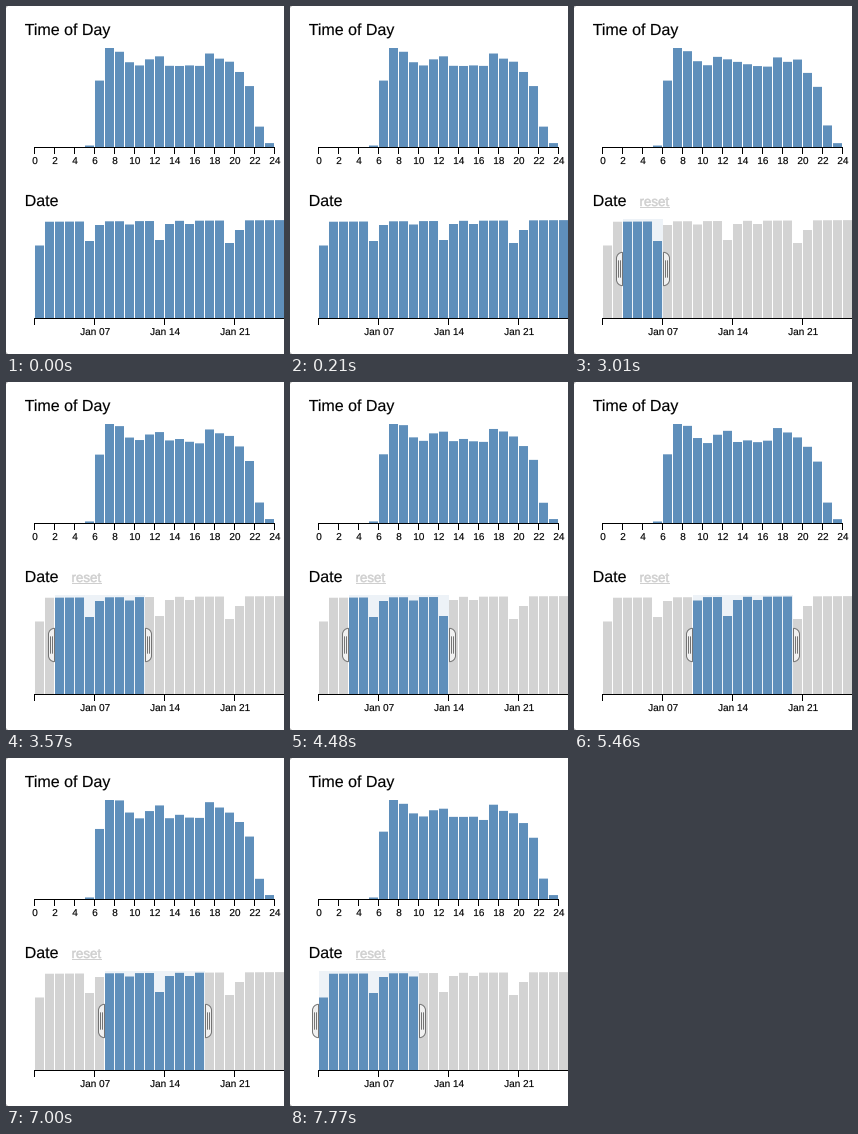
A matplotlib script for the animation above (8 s loop, 278 px wide and 348 px high).

```python
import numpy as np
import matplotlib.pyplot as plt
from matplotlib.animation import FuncAnimation
from matplotlib.collections import PolyCollection
from matplotlib.patches import PathPatch, Polygon, Rectangle
from matplotlib.path import Path
from matplotlib.textpath import TextPath
from matplotlib.transforms import Affine2D

W, H, DPI = 278, 348, 64
PX = 72 / DPI                      # points per pixel
LOOP, STEP = 8000, 40
X0, HOUR_Y, DATE_Y = 29, 142, 313  # chart left edge and the two baselines
BLUE, GREY, PALE, FAINT = "#5f8fbb", "#d3d3d3", "#edf2f7", "#cfcfcf"
DAYS, HOURS = 28, 24

plt.rcParams["font.family"] = "Liberation Sans"

# Daily totals: nearly flat and slowly rising, apart from quiet days
QUIET = {0: 73.5, 5: 78, 6: 94, 9: 94.5, 12: 79, 13: 95, 15: 95, 19: 76, 20: 89}
day_heights = np.array([QUIET.get(d, 97.2 + .07 * d) for d in range(DAYS)])

# Traffic by hour: a common curve with seeded variation from day to day
CURVE = [(4, 0), (5, 2.5), (6, 68), (7, 100), (8, 98), (9, 85.5), (10, 83.5),
         (12, 91), (13, 83), (16, 84), (17, 96), (18, 89.5), (19, 86.5),
         (20, 77.5), (21, 63), (22, 21.5), (23, 5)]
noise = np.random.default_rng(4).normal(1, .05, (DAYS, HOURS))
traffic = np.interp(np.arange(HOURS), *zip(*CURVE)) * noise

# Brush motion as (ms, day) points: stretch to ten days, drag right, sweep back
OPEN_TIME = 2310
WIDTH = [(2460, 0), (3710, 10)]
START = [(4000, 2), (4400, 2), (4410, 3), (4620, 4), (4970, 5), (5460, 9),
         (5810, 13), (6440, 17), (6510, 17), (6580, 16), (7280, 3), (7560, 0)]


def whole_days(t, points):
    return int(np.interp(t, *zip(*points)) + 1e-6)


def brush_at(t):
    """First and last edge of the brush in days, or None when closed."""
    if t < OPEN_TIME:
        return None
    start = whole_days(t, START)
    return start, start + whole_days(t, WIDTH)


def hour_heights(brush):
    first, last = brush or (0, DAYS)
    total = traffic[first:last].sum(axis=0)
    return 100 * total / max(total.max(), 1)


def bar_verts(heights, base):
    return [[(x, base), (x, base - h), (x + 9, base - h), (x + 9, base)]
            for x, h in zip(X0 + 10 * np.arange(len(heights)), heights)]


def handle_path(side):
    """Rounded grip with two ridges; side is -1 for left, 1 for right."""
    top, bottom = DATE_Y - 200 / 3, DATE_Y - 100 / 3
    k = 2.69
    pts = [(.5, top), (6.5 - k, top), (6.5, top + k), (6.5, top + 6),
           (6.5, bottom - 6), (6.5, bottom - k), (6.5 - k, bottom), (.5, bottom),
           (.5, top)]
    curve = [Path.LINETO] + [Path.CURVE4] * 3
    codes = [Path.MOVETO] + curve[1:] + curve + [Path.CLOSEPOLY]
    for x in (2.5, 4.5):
        pts += [(x, top + 8), (x, bottom - 8)]
        codes += [Path.MOVETO, Path.LINETO]
    return Path([(side * x, y) for x, y in pts], codes)


fig = plt.figure(figsize=(W / DPI, H / DPI), dpi=DPI, facecolor="white")
ax = fig.add_axes([0, 0, 1, 1])
ax.set_xlim(0, W)
ax.set_ylim(H, 0)
ax.axis("off")


def box(x, y, w, h, color, z):
    return ax.add_patch(Rectangle((x, y), w, h, fc=color, lw=0, zorder=z))


def label(x, y, text, size, color="black", centered=False, weight=.15):
    """Text as outlines, so that it keeps its place between pixels."""
    path = TextPath((0, 0), text, size=size)
    if centered:
        ink = path.get_extents()
        x -= (ink.x0 + ink.x1) / 2
    path = path.transformed(Affine2D().scale(1, -1).translate(x, y))
    return ax.add_patch(PathPatch(path, fc=color, ec=color, lw=weight * PX, zorder=4))


def axis(base, right, ticks):
    box(X0 - 1, base - 1, right - X0 + 1, 1, "black", 4)
    box(X0 - 1, base, 1, 6, "black", 4)
    for x, text in ticks:
        box(x - 1, base, 1, 6, "black", 4)
        label(x, base + 16, text, 10, centered=True)


def bars(heights, base):
    group = PolyCollection(bar_verts(heights, base), fc=BLUE, lw=0, zorder=3)
    group.set_snap(False)
    return ax.add_collection(group, autolim=False)


label(18.7, 29, "Time of Day", 16)
label(18.7, 200, "Date", 16)
axis(HOUR_Y, X0 + 240, [(X0 + 10 * h, str(h)) for h in range(0, 25, 2)])
axis(DATE_Y, W, [(X0 + 10 * d - 10, f"Jan {d:02d}") for d in (7, 14, 21)])
for y, dy in ((0, 2), (H, -2)):
    ax.add_patch(Polygon([(0, y), (2, y), (0, y + dy)], fc="#b4b4b4", lw=0))

hours = bars(hour_heights(None), HOUR_Y)
days = bars(day_heights, DATE_Y)

extent = box(X0, DATE_Y - 100, 0, 100, PALE, 2)
grips = [ax.add_patch(PathPatch(handle_path(s), fc="#f0f0f0", ec="#747474",
                                lw=PX, zorder=5)) for s in (-1, 1)]
reset = [label(65.5, 200, "reset", 13.33, FAINT, weight=.5),
         box(66, 201, 30, 1, FAINT, 3)]
brush_parts = [extent, *grips, *reset]


def update(n):
    brush = brush_at(n * STEP + STEP - 5)
    hours.set_verts(bar_verts(hour_heights(brush), HOUR_Y))
    for part in brush_parts:
        part.set_visible(brush is not None)
    first, last = brush or (0, DAYS)
    days.set_facecolor([BLUE if first <= d < last else GREY for d in range(DAYS)])
    extent.set_x(X0 + 10 * first)
    extent.set_width(10 * (last - first))
    for grip, day in zip(grips, (first, last)):
        grip.set_transform(Affine2D().translate(X0 + 10 * day, 0) + ax.transData)
    return [hours, days, *brush_parts]


anim = FuncAnimation(fig, update, frames=LOOP // STEP, interval=STEP,
                     init_func=lambda: update(0), repeat=True, repeat_delay=0)
plt.show()
```
